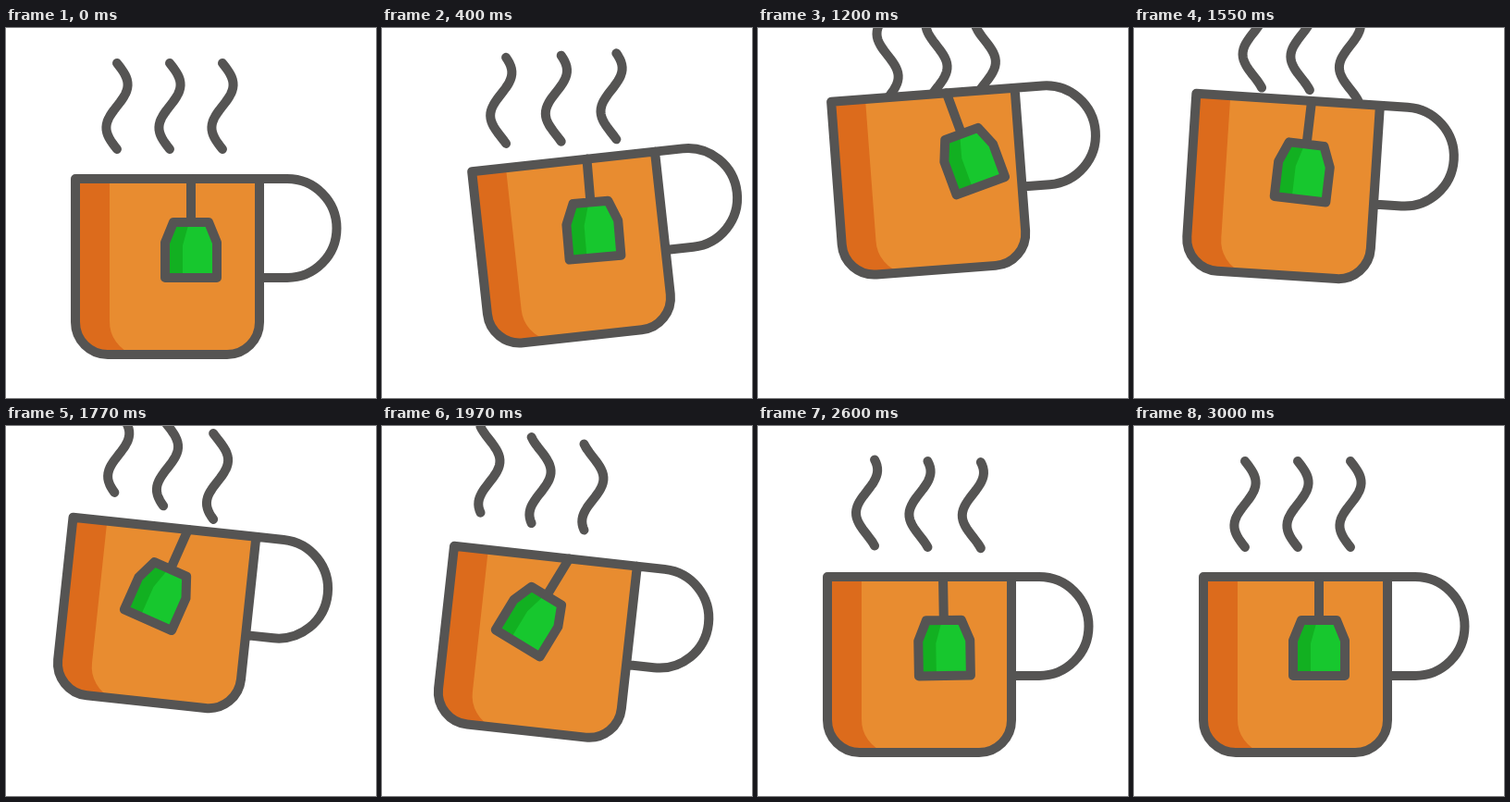
Recreate the animation shown at these times as an HTML page. Size 400 by 400 pixels, loop 3200 ms.

```html
<!DOCTYPE html>
<html lang="en">
<head>
<meta charset="utf-8">
<title>Tea cup</title>
<style>
  html, body { margin: 0; width: 100%; height: 100%; overflow: hidden; background: #fff; }
  svg { display: block; width: 100%; height: 100%; }
  .line { fill: none; stroke: #555453; stroke-width: 10; stroke-linecap: round; stroke-linejoin: round; }
</style>
</head>
<body>
<svg viewBox="0 0 400 400">
  <g class="line"><path class="steam"/><path class="steam"/><path class="steam"/></g>
  <g id="cup">
    <path fill="#e88c30" d="M75 163H274V318a35 35 0 0 1-35 35H110a35 35 0 0 1-35-35Z"/>
    <path fill="#dc6b1c" d="M75 163H112V317a37 37 0 0 0 26 36H110a35 35 0 0 1-35-35Z"/>
    <path class="line" d="M75 163H274V318a35 35 0 0 1-35 35H110a35 35 0 0 1-35-35ZM274 163H304a53.5 53.5 0 0 1 0 107H274"/>
    <g id="tag">
      <path fill="#17c72e" d="M181 210H219L228 232V270H172V232Z"/>
      <path fill="#12b021" d="M181 210H198L191 235V270H172V232Z"/>
      <path class="line" d="M200 163V210M181 210H219L228 232V270H172V232Z"/>
    </g>
  </g>
</svg>
<script>
const LOOP = 3200, MOVING = 3000;
const WAVE = 93, AMP = 11.6, STAGGER = 150;

// Key poses: time, then x shift, y shift, tilt
const cupKeys = [
  [0, 0, 0, 0], [520, 41, -27, -8], [770, 40, -46, -7.8], [1200, 11, -91, -4.3],
  [1550, -14, -86, 3.7], [1970, -8, -23, 6.3], [2260, 0, 0, 0]
];
// time, swing relative to the cup
const tagKeys = [[0, 0], [770, 0], [1200, -16], [1970, 25], [2600, -1], [MOVING, 0]];
// time, x shift, y shift, wave phase
const steamKeys = [
  [0, 0, 0, 0], [770, 24, -25, .23], [1200, 16, -60, .56], [1550, 4, -64, .14],
  [1970, -6, -26, -.15], [2600, -2, 0, .13], [MOVING, 0, 0, 0]
];

// Smooth Hermite curve through the keys, at rest at both ends
function sample(keys, t) {
  const last = keys.length - 1;
  if (t >= keys[last][0]) return keys[last].slice(1);
  const i = keys.findIndex(k => k[0] > t) - 1;
  const a = keys[i], b = keys[i + 1], span = b[0] - a[0], u = (t - a[0]) / span;
  const slope = (k, c) => k === 0 || k === last ? 0 :
    (keys[k + 1][c] - keys[k - 1][c]) / (keys[k + 1][0] - keys[k - 1][0]);
  return a.slice(1).map((v, j) => {
    const c = j + 1;
    return v + (b[c] - v) * u * u * (3 - 2 * u)
      + slope(i, c) * span * u * (1 - u) ** 2
      - slope(i + 1, c) * span * u * u * (1 - u);
  });
}

// One full wave rising from (x, y)
function steamPath(x, y, phase) {
  const points = [];
  for (let rise = 0; rise <= WAVE; rise += 3) {
    points.push([x + AMP * Math.sin(2 * Math.PI * (phase - rise / WAVE)), y - rise]);
  }
  return "M" + points.join("L");
}

const cup = document.getElementById("cup");
const tag = document.getElementById("tag");
const steams = document.querySelectorAll(".steam");

function draw() {
  const t = performance.now() % LOOP;
  const [x, y, tilt] = sample(cupKeys, t);
  cup.setAttribute("transform", `translate(${x} ${y}) rotate(${tilt} 174.5 258)`);
  tag.setAttribute("transform", `rotate(${sample(tagKeys, t)} 200 163)`);

  // The right plume leads and the left one trails; all share one wave phase
  const phase = sample(steamKeys, t)[2];
  const lead = STAGGER * Math.sin(Math.PI * t / MOVING);
  steams.forEach((steam, i) => {
    const [dx, dy] = sample(steamKeys, t + (i - 1) * lead);
    steam.setAttribute("d", steamPath(120 + 57 * i + dx, 131 + dy, phase));
  });
  requestAnimationFrame(draw);
}
draw();
</script>
</body>
</html>
```
